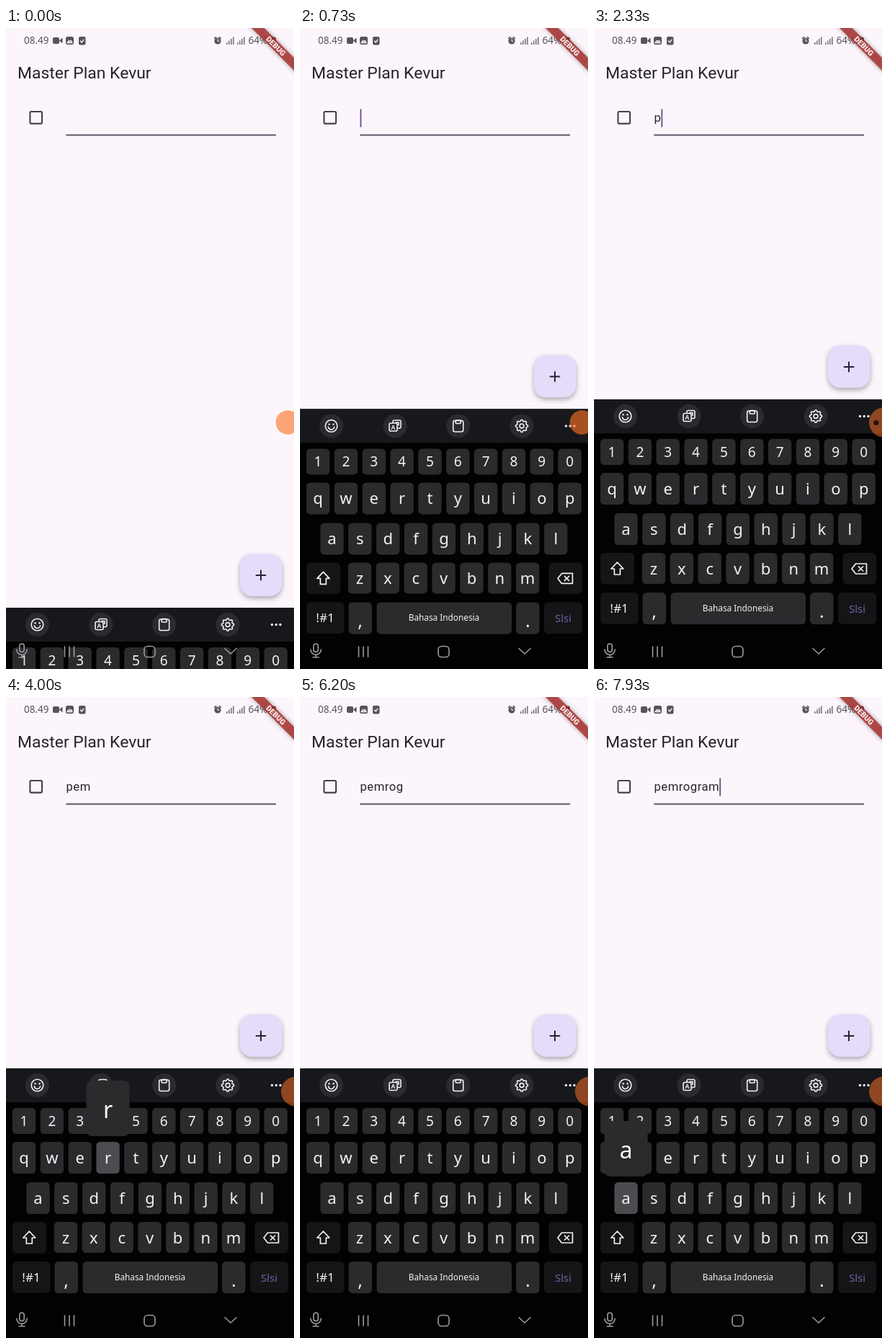
Write an HTML page with a canvas that moves like this. It is 400 px wide and 889 px high and loops after 8 s.

```html
<!DOCTYPE html>
<html lang="id">
<head>
<meta charset="utf-8">
<title>Master Plan Kevur</title>
<style>
html, body { margin: 0; width: 100%; height: 100%; overflow: hidden; background: #fcf6fc; }
canvas { display: block; width: 400px; height: 889px; }
</style>
</head>
<body>
<canvas id="stage"></canvas>
<script>
const W = 400, H = 889, LOOP = 8000;
const canvas = document.getElementById('stage');
const ctx = canvas.getContext('2d');
const dpr = window.devicePixelRatio || 1;
canvas.width = W * dpr;
canvas.height = H * dpr;

const PAPER = '#fcf6fc', INK = '#25222a', GLYPH = '#f2f2f4';
const KEY = '#2b2b2e', KEY_DARK = '#151517', KEY_DOWN = '#4c4c50', BAR = '#17181b', CHIP = '#2a2b2e';
const SANS = '"Noto Sans", sans-serif', ROBOTO = 'Roboto, sans-serif';

// [letter, moment it lands in the field]
const TYPED = [['p', 2230], ['e', 2900], ['m', 3450], ['r', 4150], ['o', 4950],
  ['g', 5450], ['r', 6500], ['a', 7250], ['m', 7650], ['a', 8100]];

// [characters, centre of first key, top, height]
const ROWS = [['1234567890', 25, 570, 36], ['qwertyuiop', 25, 617, 44],
  ['asdfghjkl', 44.5, 673, 44], ['zxcvbnm', 83, 728, 43]];
const PITCH = 38.85;

function box(x, y, w, h, r, fill) {
  ctx.beginPath();
  ctx.roundRect(x, y, w, h, r);
  if (fill) { ctx.fillStyle = fill; ctx.fill(); }
}

function disc(x, y, r, fill) {
  ctx.beginPath();
  ctx.arc(x, y, r, 0, Math.PI * 2);
  if (fill) { ctx.fillStyle = fill; ctx.fill(); }
}

function pen(color, width) {
  ctx.strokeStyle = color;
  ctx.lineWidth = width;
  ctx.lineCap = ctx.lineJoin = 'round';
}

function path(points, close) {
  ctx.beginPath();
  for (let i = 0; i < points.length; i += 2) ctx.lineTo(points[i], points[i + 1]);
  if (close) ctx.closePath();
  ctx.stroke();
}

function text(s, x, y, font, color, align = 'center', spacing = 0) {
  ctx.font = font;
  ctx.fillStyle = color;
  ctx.textAlign = align;
  ctx.letterSpacing = spacing + 'px';
  ctx.fillText(s, x, y);
}

function at(x, y, draw) {
  ctx.save();
  ctx.translate(x, y);
  draw();
  ctx.restore();
}

function statusBar() {
  const c = '#57535a';
  text('08.49', 25, 22, '13.5px ' + SANS, c, 'left');
  box(65, 13, 9, 9, 2, c);
  ctx.beginPath();
  ctx.moveTo(74, 17.5); ctx.lineTo(78.5, 13.5); ctx.lineTo(78.5, 21.5);
  ctx.fill();
  box(83, 12, 11, 11, 2.5, c);
  pen(PAPER, 1.3);
  path([85, 20.5, 87.5, 17.5, 89, 19, 90.5, 17.5, 92, 20.5], true);
  box(101, 12, 9.5, 11.5, 2, c);
  path([103.5, 18, 105.2, 20, 108, 16.2]);

  disc(294, 18, 4.6, c);
  pen(c, 1.5);
  path([289.5, 14.5, 291.5, 12.6]);
  path([298.5, 14.5, 296.5, 12.6]);
  pen(PAPER, 1);
  path([294, 15.5, 294, 18.3, 296, 18.3]);
  ctx.fillStyle = '#77737b';
  for (const x of [306, 321])
    for (let i = 0; i < 4; i++) ctx.fillRect(x + i * 3, 20 - i * 2.5, 1.6, 3 + i * 2.5);
  text('64%', 336.5, 22, '13.5px ' + SANS, c, 'left');
  box(366, 12.5, 9, 10, 3, '#4a454c');
}

function debugBanner() {
  at(W, 0, () => {
    ctx.rotate(Math.PI / 4);
    ctx.shadowColor = 'rgba(0,0,0,.45)';
    ctx.shadowBlur = 6 * dpr;
    ctx.fillStyle = 'rgba(172,50,48,.82)';
    ctx.fillRect(-46, 29.2, 92, 12.5);
    ctx.shadowColor = 'transparent';
    text('DEBUG', 0, 39.2, '900 10.4px ' + ROBOTO, '#fbeef0');
  });
}

function fab(dy) {
  ctx.save();
  ctx.shadowColor = 'rgba(50,40,60,.4)';
  ctx.shadowBlur = 7 * dpr;
  ctx.shadowOffsetY = 3 * dpr;
  box(325, 440.5 + dy, 58.4, 58.4, 16.7, '#e7dbfa');
  ctx.restore();
  pen('#2a2038', 2);
  ctx.lineCap = 'butt';
  path([346.8, 470 + dy, 361.2, 470 + dy]);
  path([354, 462.8 + dy, 354, 477.2 + dy]);
}

function field(t) {
  pen('#45404a', 2.1);
  box(33.4, 116, 16.6, 16.6, 1.5);
  ctx.stroke();
  ctx.fillStyle = '#5f5568';
  ctx.fillRect(83.3, 147.5, 291.7, 2);

  const done = TYPED.filter(k => k[1] <= t);
  const value = done.map(k => k[0]).join('');
  text(value, 83.4, 130.3, '16.67px ' + ROBOTO, INK, 'left', 0.52);
  const since = t - (done.length ? done[done.length - 1][1] : 500);
  if (since >= 0 && since % 1000 < 500) {
    ctx.fillStyle = '#74598f';
    ctx.fillRect(83.4 + (value ? ctx.measureText(value).width : 0), 112.5, 2, 25);
  }
}

function toolbar() {
  ctx.fillStyle = BAR;
  ctx.fillRect(0, 515, W, 47);
  for (const x of [43.5, 132, 219.7, 308]) disc(x, 538.5, 16.5, CHIP);
  pen(GLYPH, 1.6);
  at(43.5, 538.5, () => {
    disc(0, 0, 8.3);
    ctx.stroke();
    disc(-3, -2.3, 1.2, GLYPH);
    disc(3, -2.3, 1.2, GLYPH);
    ctx.beginPath();
    ctx.arc(0, 0.8, 4.2, 0.15, Math.PI - 0.15);
    ctx.stroke();
  });
  at(132, 538.5, () => {
    box(-3, -8, 11, 11, 2);
    ctx.stroke();
    box(-8, -4, 11, 11, 2, CHIP);
    ctx.stroke();
    text('A', -2.5, 4.8, 'bold 8.5px ' + SANS, GLYPH);
    path([1, -5, 5, -5, 5, -1]);
  });
  at(219.7, 538.5, () => {
    box(-7, -7.5, 14, 15.5, 2.5);
    ctx.stroke();
    box(-3.5, -8, 7, 4.5, 1);
    ctx.stroke();
  });
  at(308, 538.5, () => {
    ctx.beginPath();
    for (let i = 0; i < 64; i++) {
      const a = i / 64 * Math.PI * 2;
      const r = 7.6 + Math.max(-0.9, Math.min(0.9, 2 * Math.cos(a * 8)));
      ctx.lineTo(r * Math.cos(a), r * Math.sin(a));
    }
    ctx.closePath();
    ctx.stroke();
    disc(0, 0, 2.9);
    ctx.stroke();
  });
  for (const x of [369.5, 375.3, 381]) disc(x, 538.5, 1.7, GLYPH);
}

function specialKeys() {
  for (const [x, y, w] of [[9, 728, 47], [345.5, 728, 46.5], [9, 783, 52.5], [339, 783, 53]])
    box(x, y, w, 43.5, 5.5, KEY_DARK);
  for (const [x, w] of [[67.5, 32.5], [106.5, 187.5], [300, 32.5]])
    box(x, 783, w, 44, 5.5, KEY);
  pen(GLYPH, 1.7);
  at(32.3, 750, () => path([0, -9, 8.5, 0, 4, 0, 4, 8, -4, 8, -4, 0, -8.5, 0], true));
  at(368.5, 750, () => {
    path([-10.5, 0, -5, -7, 10, -7, 10, 7, -5, 7], true);
    path([-1, -3, 5, 3]);
    path([-1, 3, 5, -3]);
  });
  text('!#1', 35, 811, '17px ' + SANS, GLYPH);
  text(',', 83.5, 818, '25px ' + SANS, GLYPH);
  text('Bahasa Indonesia', 200, 809, '11.8px ' + SANS, GLYPH);
  text('.', 316.3, 818, '25px ' + SANS, GLYPH);
  text('Slsi', 365.5, 810.5, '15px ' + SANS, '#6863a0');
}

function keyboard(t, dy) {
  const press = TYPED.find(k => t >= k[1] - 250 && t < k[1]);
  const held = press && t < press[1] - 80;
  let pop = null;
  at(0, dy, () => {
    ctx.fillStyle = '#020202';
    ctx.fillRect(0, 515, W, H);
    toolbar();
    ROWS.forEach(([chars, x0, top, h], row) => {
      [...chars].forEach((ch, i) => {
        const x = x0 + i * PITCH;
        const hit = press && press[0] === ch;
        if (hit) pop = [x, top - 85];
        box(x - 16.2, top, 32.4, h, 5.5, hit && held ? KEY_DOWN : KEY);
        if (row) text(ch, x, top + 30, '22px ' + SANS, GLYPH);
        else text(ch, x, top + 25, '19px ' + SANS, GLYPH);
      });
    });
    specialKeys();
    if (pop) {
      box(pop[0] - 30, pop[1], 60, 77, 8, KEY);
      text(press[0], pop[0], pop[1] + 51.5, '32px ' + SANS, '#fafafa');
    }
  });
}

function navBar() {
  pen('#9b9b9f', 1.6);
  at(22, 863, () => {
    box(-3.2, -9, 6.4, 11.5, 3.2);
    ctx.stroke();
    ctx.beginPath();
    ctx.arc(0, -1, 7.2, 0, Math.PI);
    ctx.stroke();
    path([0, 6.5, 0, 9.5]);
    path([-4, 9.8, 4, 9.8]);
  });
  for (const x of [81.5, 88, 94.5]) path([x, 858, x, 872]);
  box(192, 857.5, 15, 15, 4.5);
  ctx.stroke();
  path([304, 860.5, 312, 868, 320, 860.5]);
}

function bubble(t) {
  const p = Math.min(1, Math.max(0, (t - 1900) / 300));
  disc(391.5 + 11 * p, 547, 16.8 + 3.7 * p, `rgba(255,115,40,${0.62 - 0.1 * p})`);
  if (t >= 2200 && t < 2700) disc(392, 547.5, 3.6, '#241008');
}

function snap(t) {
  const u = t % 200;
  return t - u + (u < 130 ? 0 : 130);
}

function draw(t) {
  ctx.setTransform(dpr, 0, 0, dpr, 0, 0);
  ctx.fillStyle = PAPER;
  ctx.fillRect(0, 0, W, H);
  const dy = 289 * Math.pow(Math.max(0, 1 - t / 1140), 3);
  statusBar();
  text('Master Plan Kevur', 16, 69.5, '22.9px ' + ROBOTO, INK, 'left');
  field(t);
  fab(dy);
  debugBanner();
  keyboard(t, dy);
  navBar();
  bubble(t);
}

const begin = performance.now();
function frame() {
  draw(snap((performance.now() - begin) % LOOP));
  requestAnimationFrame(frame);
}
frame();
</script>
</body>
</html>
```
